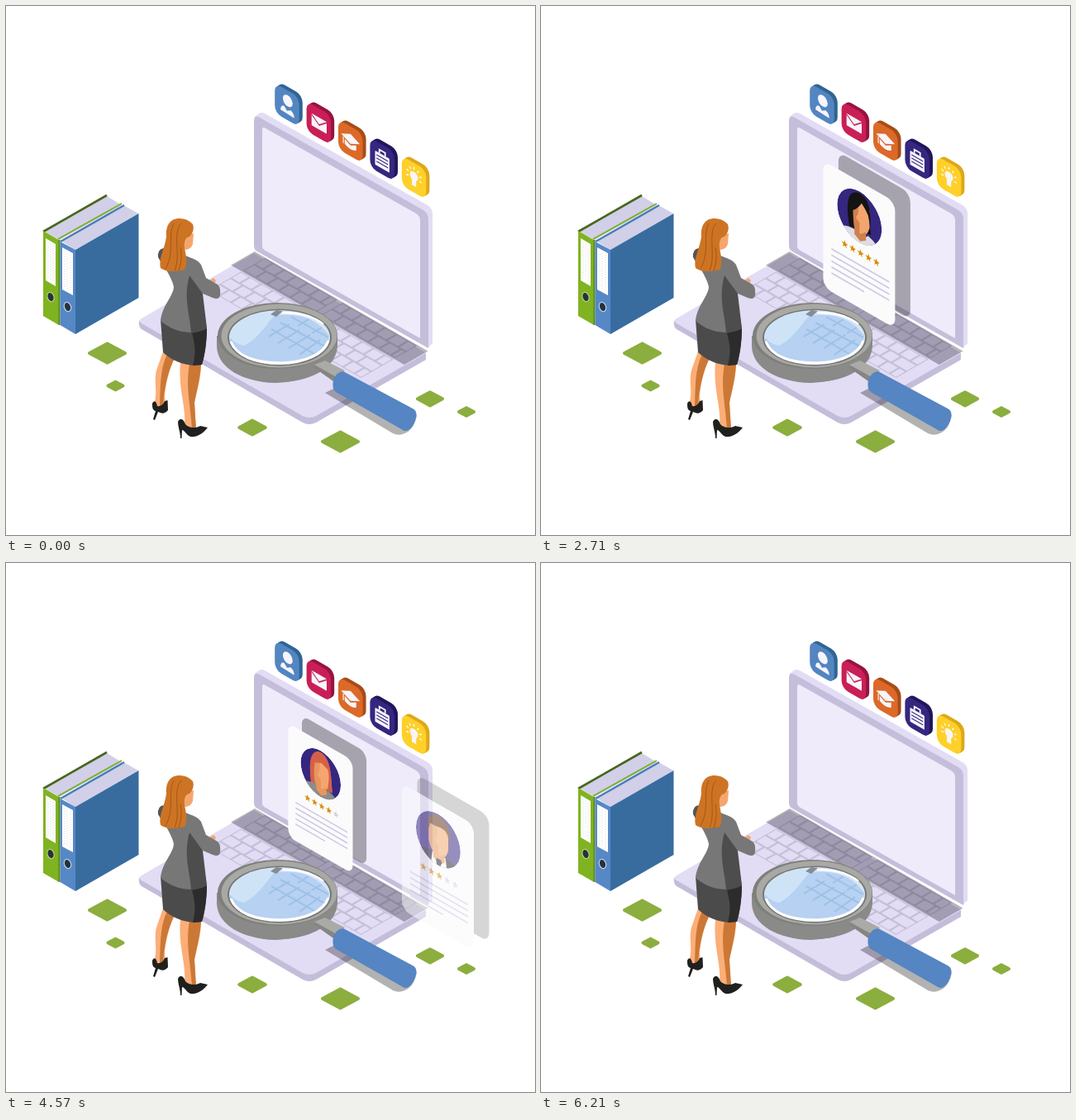
These frames come from a looping animation (640x640 px, 6280 ms). An HTML page:

```html
<!DOCTYPE html>
<html lang="en">
<head>
<meta charset="utf-8">
<title>Candidate search</title>
<style>
html, body { margin: 0; width: 100%; height: 100%; overflow: hidden; background: #fff; }
svg { display: block; width: 100%; height: 100%; }
</style>
</head>
<body>
<svg id="stage" viewBox="0 0 640 640">
  <defs><clipPath id="disc"><circle r="31"/></clipPath></defs>
  <g id="tiles"></g>

  <g id="binders">
    <path fill="#d2cfe8" d="M47 273L122 230L140 241L65 283Z"/>
    <path stroke="#48661b" stroke-width="2.6" d="M45 273L122 229"/>
    <path fill="#80b321" d="M45 272L64 283V386L45 375Z"/>
    <path stroke="#5a8a1a" stroke-width="2" d="M64.500 283V386"/>
    <path fill="#d2cfe8" d="M68 285L142 241L160 251L84 295Z"/>
    <path stroke="#7fae2b" stroke-width="2" d="M63 282L140 239"/>
    <path stroke="#477eb9" stroke-width="2.5" d="M66 285L143 241"/>
    <path fill="#5688c6" d="M65.500 285L84 295V397L65.500 386Z"/>
    <path fill="#386c9f" d="M84 295L160.500 251V353L84 397Z"/>
    <path fill="#fff" d="M48 281L60 288V339L48 332ZM68 292L81 299V350L68 343Z"/>
    <path stroke="#d9d9de" stroke-dasharray="1 2" d="M51 286V330M54 288V332M57 290V334M71 297V341M74 299V343M78 301V345"/>
    <g fill="#263238" stroke-width="1.2">
      <ellipse cx="54" cy="352" rx="4" ry="5.800" stroke="#b7cf80" transform="rotate(-18 54 352)"/>
      <ellipse cx="74.500" cy="364" rx="4" ry="5.800" stroke="#b9d0ee" transform="rotate(-18 74.5 364)"/>
    </g>
  </g>

  <g id="laptop">
    <path fill="#c4bdda" d="M161 381L300 300L508 420V428L375 504Q367 508 359 504L164 391Q160 388 161 381Z"/>
    <path fill="#e2dcf5" d="M164 378L300 299L508 420L375 496Q367 500 359 496L164 384Q159 381 164 378Z"/>
    <g id="keyboard" transform="matrix(.87 .5 -.87 .5 313 305)"></g>
    <path fill="#e2dcf4" d="M301 134L306 130Q309 128 313 130L510 241Q516 245 516 251V408L511 413Z"/>
    <path fill="#c5bedb" d="M300 139Q300 131 307 135L505 247Q511 251 511 258V414L304 297Q300 295 300 290Z"/>
    <path fill="#f0ebfb" d="M310 150Q310 145 314 148L496 251Q501 254 501 259V402L314 296Q310 294 310 290Z"/>
  </g>

  <g id="magnifier">
    <path fill="#000" opacity=".3" d="M386 468L400 461L497 495Q494 514 480 518Q474 520 468 517Z"/>
    <path fill="#7a7690" opacity=".7" d="M262 425C275 462 375 468 397 425Z"/>
    <path fill="#8a8a88" d="M255 399H401V412C399 439 368 454 326 456C286 455 256 438 255 412Z"/>
    <path fill="#858583" d="M372 437L386 429L408 441L396 454Z"/>
    <path fill="#aaaaa7" d="M373 434L386 429L410 441L400 449Z"/>
    <ellipse cx="328.500" cy="399" rx="72.500" ry="40" fill="#7e7e7b"/>
    <ellipse cx="330.500" cy="399" rx="70" ry="38.500" fill="#a8a8a4"/>
    <ellipse cx="331" cy="401" rx="63" ry="34.500" fill="#777774"/>
    <ellipse cx="331" cy="401" rx="61" ry="33" fill="#d6e5f7"/>
    <path fill="#b6d1f1" d="M270 402C292 404 300 378 330 374Q370 370 391 399C388 420 361 430 330 430C298 430 274 419 270 402Z"/>
    <path fill="#cfe3f7" d="M271 398C278 376 303 370 329 371C318 379 309 400 288 411C278 409 272 404 271 398Z"/>
    <path fill="none" stroke="#9dc0e6" stroke-width="2" d="M321 391L375 422M332 383L386 412M345 376L390 401M343 385L318 400M355 392L329 408M368 398L342 414M380 404L355 422M366 379L353 387M382 389L370 396"/>
    <path fill="#858b93" d="M320 373L327 368L335 369L327 376Z"/>
    <path fill="none" stroke="#fff" stroke-width="3" d="M272 406C279 424 302 432 331 432C360 432 384 422 390 405"/>
    <path fill="none" stroke="#fff" stroke-width="2.500" d="M334 371Q367 371 384 385"/>
    <path fill="#5585c2" d="M408 442L492 487Q498 490 496 498C494 507 488 515 482 514L399 467Q394 463 396 453Q400 442 408 442Z"/>
  </g>

  <g id="woman">
    <path fill="#fcae77" d="M190 418L204 426C197 440 194 455 192 470L193 484L181 484L180 478C184 464 177 452 184 435Z"/>
    <path fill="#cb7836" d="M195 421L204 426C196 442 193 458 191 472L190 484H186C187 460 186 440 195 421Z"/>
    <path fill="#fcae77" d="M211 431L236 434C236 450 231 465 228 480L230 513L216 506C218 484 208 464 211 431Z"/>
    <path fill="#cb7836" d="M222 433H236C235 450 231 465 228 480L230 512H225C223 480 217 462 222 433Z"/>
    <path fill="#20201f" d="M177 481C179 476 182 478 183 484Q189 485 192 478L195.500 477L196 489C191 495 187 492 184 491L180 501L178 500L181 490C177 489 177 485 177 481ZM208 503C211 497 215 500 217 506C222 511 230 511 235 508L244 510C238 518 230 522 223 521C218 519 216 513 213 513L212.500 523H211C211 515 208 510 208 503Z"/>
    <path fill="#4b4b4b" d="M187 379C205 396 225 398 243 389C243 406 240 425 237 434C220 437 201 430 190 419Z"/>
    <path fill="#2c2c2c" d="M225 396L243 390C243 408 240 425 237 434L226 435C230 420 229 410 225 396Z"/>
    <path fill="#f3a66c" d="M245 333L251 329L254 332L252 337Z"/>
    <path fill="#555" d="M191 293Q183 294 184 304L190 314L200 300Z"/>
    <path fill="#777" d="M190 297C202 300 215 300 222 304Q232 307 236 313L242 329L256 337Q260 340 259 350Q258 356 250 353L236 347L243 390C225 398 205 396 187 381C189 362 202 352 203 340C201 330 195 322 190 312Z"/>
    <path fill="#4d4d4d" d="M222 326L238 348L243 390Q235 395 224 395C223 375 214 353 222 326Z"/>
    <path fill="#f5a66d" d="M216 279L223 276L227 275L226 288Q224 295 216 295Z"/>
    <path fill="#cd7424" d="M210 257C198 257 193 266 194 279C192 294 184 306 187 317Q196 324 216 319C220 312 218 302 216 293Q215 283 219 280C226 279 229 267 225 263Q219 257 210 257Z"/>
    <path fill="none" stroke="#a85413" d="M203 263C195 278 205 296 193 318M212 263C201 275 212 302 204 320M211 292Q214 306 209 320"/>
  </g>
  <g id="icons"></g>
  <g id="cards"></g>
</svg>
<script>
const LOOP = 6280, STEP = LOOP / 88;
const PERIOD = 1480, LEAVE = 1203, LEAVE_TIME = 562, DISTANCE = 186;
const GROW = 235, SETTLED = 520, PEAK = 1.195;
const CENTER = [388.5, 280.5];

const byId = id => document.getElementById(id);
const range = n => [...Array(n).keys()];
const wall = (x, y) => `transform="matrix(.87 .5 0 1 ${x} ${y})"`;
const path = (fill, d) => `<path fill="${fill}" d="${d}"/>`;

// Floor diamonds: centre x, centre y, half width
byId('tiles').innerHTML = [
  [122.5, 420, 21.5], [132.5, 459.5, 9], [298, 510, 15.7],
  [404.5, 527, 21.5], [513, 475.3, 15], [557, 491, 9]
].map(([x, y, w]) => {
  const h = w * .54;
  return `<path fill="#8bae3e" stroke="#8bae3e" stroke-width="4" stroke-linejoin="round"
    d="M${x - w} ${y}L${x} ${y - h}L${x + w} ${y}L${x} ${y + h}Z"/>`;
}).join('');

// Keyboard, in floor coordinates
const keyRow = (y, row) => {
  const block = (start, end) => {
    const edges = [start];
    for (let x = start + 12 + row * 5 % 9; x < end - 6; x += 16) edges.push(x);
    edges.push(end);
    return edges.slice(1).map((x, i) =>
      `<rect x="${edges[i] + 1.3}" y="${y + 1.3}" width="${x - edges[i] - 2.6}" height="12.400" rx="1"/>`).join('');
  };
  return block(0, 101) + block(108, 212);
};
byId('keyboard').innerHTML = `
  <path fill="#c5bfd8" d="M0 0H101V30H0ZM108 0H212V30H108ZM0 33H101V78H0ZM108 33H212V78H108Z"/>
  <g fill="#e2dcf5">${[0, 15, 33, 48, 63].map(keyRow).join('')}</g>
  <rect x="-15" y="-1" width="241" height="33" fill="#141020" opacity=".31"/>`;

// Icon row
const rays = range(7).map(i => {
  const a = Math.PI * (1 + (i - .5) / 5), c = Math.cos(a), s = Math.sin(a);
  return `M${17 + 8 * c} ${14 + 8 * s}L${17 + 11 * c} ${14 + 11 * s}`;
}).join('');
const icons = [
  ['#5385c1', '#2f6494', `<circle cx="18" cy="10.500" r="6.800"/>
    <path d="M8 26Q8 20 13 19L17 23L22 20Q27 21 27 27Z"/>`],
  ['#c91f56', '#97133f', `<rect x="7" y="9" width="21" height="14.500" rx="1"/>
    <path d="M7 10L17.500 18L28 10" fill="none" stroke="#c91f56" stroke-width="1.500"/>`],
  ['#dc6928', '#a74c18', `<path d="M17 7L30 13L17 19L4 13Z"/><path d="M9 17L17 21L25 17V23Q17 28 9 23Z"/>
    <path d="M7 15V23" stroke="#fff" stroke-width="1.300"/>`],
  ['#35267f', '#21165a', `<path d="M13 10V6H21V10" fill="none" stroke="#fff" stroke-width="2"/>
    <rect x="7" y="10" width="20" height="17" rx="1"/>
    <path d="M9 14H25M9 18H25M9 22H25" stroke="#35267f" stroke-width="1.200"/>`],
  ['#ffd029', '#dea819', `<path d="M17 9C10 9 10 16 14 19V26H20V19C24 16 24 9 17 9Z"/>
    <path d="${rays}" stroke="#fff" stroke-width="1.600"/>`]
];
byId('icons').innerHTML = icons.map(([front, side, glyph], i) => {
  const x = 325.2 + 38.4 * i, y = 93.3 + 22 * i;
  const plate = (dx, dy, fill) => `<rect width="34" height="36" rx="9" fill="${fill}" ${wall(x + dx, y + dy)}/>`;
  return plate(4, -2.3, side) + plate(2, -1.2, side) + plate(0, 0, front) +
    `<g fill="#f7f5fb" ${wall(x, y + 2)}>${glyph}</g>`;
}).join('');

// Portraits around (0, 0), clipped to a disc
const face = (light, dark) =>
  path(light, 'M-13 -14Q0 -26 14 -14V6Q11 19 2 21Q-11 18 -13 6Z') +
  path(dark, 'M-13 -14Q-6 -23 -1 -20L-2 -3L-5 3L0 7V21Q-11 18 -13 6Z') +
  path(dark, 'M-7 14L1 20L9 14V24L1 29L-7 24Z');
const suit = color =>
  path(color, 'M-31 31V25Q-24 18 -8 17L1 31L10 17Q25 19 31 27V31Z') +
  path('#fff', 'M-8 17L1 24L10 17L12 31H-10Z');
const tie = path('#25212d', 'M-2 23H4L5 26L3 31H-2L-3 26Z');
const portraits = [
  suit('#8b8b8b') + face('#e8975c', '#d68349') + tie +
    path('#402416', 'M-14 -6V-16Q-11 -30 4 -29Q18 -27 16 -5L13 -11L10 -18Q-4 -17 -11 -17Z' +
      'M-13 4Q-9 9 -4 6Q1 3 6 6Q11 8 14 2V10Q10 22 1 22Q-10 20 -13 11Z') +
    path('#d68349', 'M-4 10Q1 7 6 10Q1 13 -4 10Z'),
  path('#151314', 'M-14 18C-19 -4 -18 -27 1 -29Q17 -27 14 0L16 14Z') +
    path('#dedee2', 'M-31 31V27Q-21 18 -7 18L2 26L12 17Q25 20 31 31Z') + face('#f2a56d', '#cf804c') +
    path('#151314', 'M-14 16C-18 -8 -17 -27 1 -28Q17 -26 15 5L12 -8Q8 -14 3 -18Q-3 -8 -9 -4Q-9 8 -7 18Z'),
  suit('#28242c') + face('#f3a56b', '#e6955c') + tie +
    path('#5e2f14', 'M-15 -2L-15 -18Q-9 -32 5 -28Q18 -25 16 -2L13 -12Q10 -17 2 -16Q-7 -14 -11 -15Z'),
  path('#d4604a', 'M-15 19C-18 2 -19 -28 1 -29C18 -27 15 0 18 17Z') +
    path('#8c8c8c', 'M-31 31V25Q-20 18 -7 17Q1 27 11 17Q26 20 31 31Z') + face('#f5a66e', '#e8955e') +
    path('#d4604a', 'M-15 18C-18 -2 -18 -27 1 -28C17 -26 16 0 18 17L11 13Q14 -3 11 -11L1 -15L-9 -11Q-12 2 -9 15Z')
];
const ratings = [5, 5, 3, 4];

const star = (x, y, fill) => {
  const points = range(10).map(i => {
    const a = Math.PI * (i / 5 - .5), r = i % 2 ? 2 : 4.8;
    return `${x + r * Math.cos(a)},${y + r * Math.sin(a)}`;
  });
  return `<polygon fill="${fill}" points="${points.join(' ')}"/>`;
};
const sheet = fill => `<rect width="100" height="152.800" rx="11" ${fill}/>`;
const lines = range(5).map(i => `M11.500 ${101 + 7.3 * i}H${i < 4 ? 92 : 57}`).join('');

byId('cards').innerHTML = portraits.map((portrait, i) => `<g>
  <g ${wall(354.5, 173.5)}>${sheet('fill="#101014" opacity=".33"')}</g>
  <g ${wall(336, 184)}>${sheet('fill="#fbfbfc"')}
    <g transform="translate(50.5 43)" clip-path="url(#disc)"><circle r="31" fill="#35267f"/>${portrait}</g>
    ${range(5).map(n => star(30 + 11 * n, 86, n < ratings[i] ? '#d98d06' : '#d3cfe6')).join('')}
    <path d="${lines}" stroke="#cfcae4" stroke-width="2"/>
  </g></g>`).join('');
const cards = [...byId('cards').children];

function popScale(t) {
  if (t <= 0) return 0;
  if (t < GROW) return PEAK * Math.sin(t / GROW * Math.PI / 2);
  if (t < SETTLED) return 1 + (PEAK - 1) * ((SETTLED - t) / (SETTLED - GROW)) ** 1.4;
  return 1;
}

function render(now) {
  // The motion runs in held steps of about 71 ms
  const time = Math.floor((now % LOOP + 5) / STEP) % 88 * STEP;
  cards.forEach((card, i) => {
    const t = time - i * PERIOD;
    const u = Math.min(1, Math.max(0, (t - LEAVE) / LEAVE_TIME));
    const shift = DISTANCE * (u / 2 + (1 - Math.cos(Math.PI * u)) / 4);
    const scale = popScale(t);
    card.style.display = scale > 0 && u < 1 ? '' : 'none';
    card.setAttribute('opacity', 1 - u ** 2.2);
    card.setAttribute('transform',
      `translate(${CENTER[0] + shift} ${CENTER[1] + shift * .577}) scale(${scale}) translate(${-CENTER[0]} ${-CENTER[1]})`);
  });
}

function tick() {
  render(performance.now());
  requestAnimationFrame(tick);
}
tick();
</script>
</body>
</html>
```
